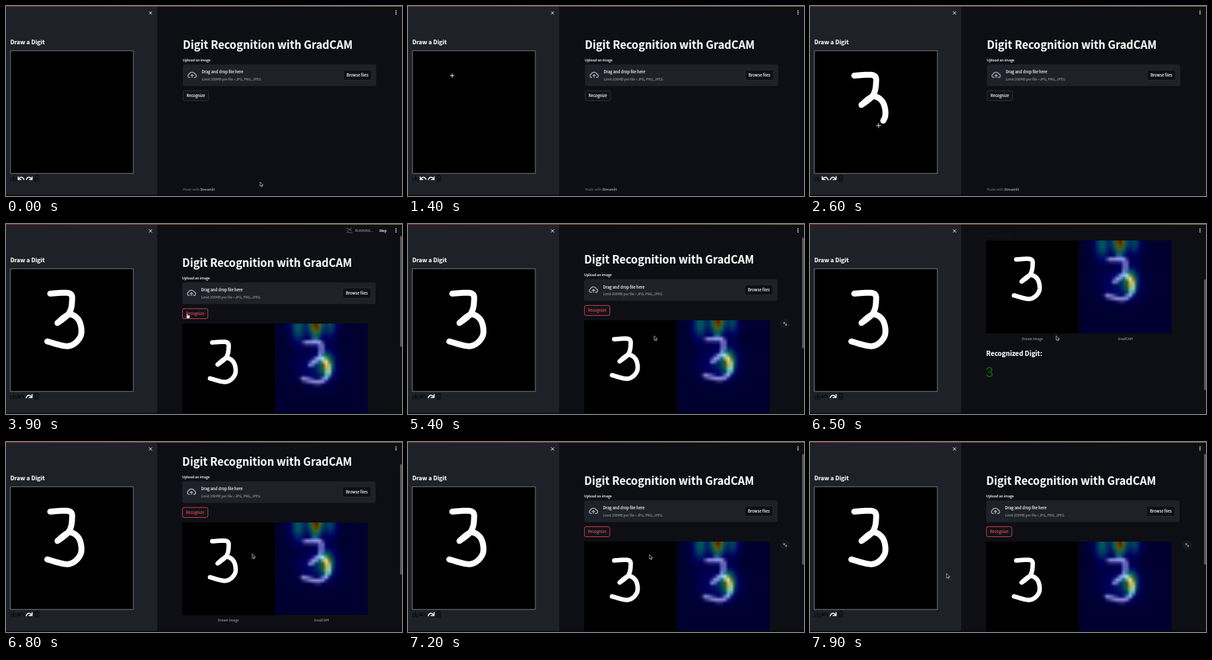
Write an HTML page with a canvas that moves like this. It is 600 px wide and 288 px high and loops after 8000 ms.

```html
<!DOCTYPE html>
<html lang="en">
<head>
<meta charset="utf-8">
<title>Digit Recognition with GradCAM</title>
<style>
html, body { margin: 0; width: 100%; height: 100%; overflow: hidden; background: #0d0f14; }
canvas { display: block; width: 600px; height: 288px; }
</style>
</head>
<body>
<canvas id="stage"></canvas>
<script>
const W = 600, H = 288, LOOP = 8000, STEP = 100;
const FONT = '"Noto Sans CJK JP", "Noto Sans CJK SC", "Noto Sans CJK", "Open Sans", sans-serif';
const BG = '#0d0f14', PANEL = '#1f2129', WHITE = '#fafafa', GREY = '#8b8c91', RED = '#e0474a', DARK = '#0b0c10';
const PEN_DOWN = 1500, PEN_UP = 2800, HOVER = 3600, RESULT = 3900;

const stage = document.getElementById('stage');
const dpr = window.devicePixelRatio || 1;
stage.width = W * dpr;
stage.height = H * dpr;
const ctx = stage.getContext('2d');

const clamp = v => Math.max(0, Math.min(1, v));
const ramp = (t, from, to) => clamp((t - from) / (to - from));
const ease = k => k * k * (3 - 2 * k);

// Pen path: a smooth curve through a few points.
const KNOTS = [[67, 105.5], [96, 105], [100, 118], [95, 136], [78, 150],
  [96, 137], [111, 147], [113, 170], [95, 185], [62.5, 178]];
const LAST = KNOTS.length - 1;
function spline(a, b, c, d, k) {
  return 0.5 * (2 * b + (c - a) * k + (2 * a - 5 * b + 4 * c - d) * k * k + (3 * b - a - 3 * c + d) * k * k * k);
}
function penAt(u) {
  const i = Math.min(LAST - 1, Math.floor(u));
  const p = n => KNOTS[Math.max(0, Math.min(LAST, n))];
  return [0, 1].map(j => spline(p(i - 1)[j], p(i)[j], p(i + 1)[j], p(i + 2)[j], u - i));
}
const penPos = t => LAST * ramp(t, PEN_DOWN, PEN_UP);

function stroke3(c, end = LAST) {
  if (end <= 0) return;
  c.beginPath();
  for (let u = 0; u < end; u += .05) c.lineTo(...penAt(u));
  c.lineTo(...penAt(end));
  c.lineWidth = 9;
  c.lineCap = c.lineJoin = 'round';
  c.strokeStyle = '#fff';
  c.stroke();
}

// Fits the drawing area into a square of the given size.
function stroke3In(c, size) {
  c.save();
  c.scale(size / 187, size / 187);
  c.translate(-6.5, -67.5);
  stroke3(c);
  c.restore();
}

// Low resolution heat overlay; each spot is x, y, width, height, strength.
const SPOTS = [[.44, -.02, .05, .12, .85], [.25, .04, .06, .12, .36], [.6, .02, .05, .1, .3],
  [.56, .44, .05, .09, .55], [.45, .47, .15, .12, .18]];
const jet = (v, peak) => clamp(1.5 - Math.abs(4 * v - peak));
function makeHeat() {
  const N = 28, c = document.createElement('canvas');
  c.width = c.height = N;
  const g = c.getContext('2d', { willReadFrequently: true });
  g.fillRect(0, 0, N, N);
  stroke3In(g, N);
  const img = g.getImageData(0, 0, N, N);
  for (let i = 0; i < N * N; i++) {
    const x = (i % N + .5) / N, y = (Math.floor(i / N) + .5) / N;
    const heat = SPOTS.reduce((sum, [cx, cy, w, h, a]) =>
      sum + a * Math.exp(-(((x - cx) / w) ** 2 + ((y - cy) / h) ** 2) / 2), 0);
    const ink = img.data[i * 4] * .55;
    for (let j = 0; j < 3; j++) img.data[i * 4 + j] = ink + 95 * jet(heat, 3 - j);
  }
  g.putImageData(img, 0, 0);
  return c;
}
const heatMap = makeHeat();

function text(s, x, y, size, color = WHITE, weight = 500, align = 'left', family = FONT) {
  ctx.font = `${weight} ${size}px ${family}`;
  ctx.fillStyle = ctx.strokeStyle = color;
  ctx.textAlign = align;
  ctx.lineWidth = .15;
  ctx.fillText(s, x, y);
  ctx.strokeText(s, x, y);
}
function box(x, y, w, h, r, fill, line) {
  ctx.beginPath();
  ctx.roundRect(x, y, w, h, r);
  ctx.fillStyle = fill;
  ctx.fill();
  if (!line) return;
  ctx.strokeStyle = line;
  ctx.lineWidth = .9;
  ctx.stroke();
}
function shape(d, x, y, line, width = 1, fill = null, flip = 1) {
  const path = new Path2D(d);
  ctx.save();
  ctx.translate(x, y);
  ctx.scale(flip, 1);
  if (fill) { ctx.fillStyle = fill; ctx.fill(path); }
  ctx.strokeStyle = line;
  ctx.lineWidth = width;
  ctx.stroke(path);
  ctx.restore();
}

function toolbar(t) {
  const arrow = 'M-4.5 -2V2.5H0M-4.3 2.2Q1 -4.5 4.5 3';
  shape('M-4 -1V4H4V-1M0 -4V2M-2 0L0 2L2 0', 11.5, 261, DARK, 1.2);
  shape(arrow, 23, 260.5, t < PEN_UP ? WHITE : DARK, 1.5);
  shape(arrow, 35, 260.5, WHITE, 1.5, null, -1);
  shape('M-4 -3.2H4M-1.5 -4.5H1.5M-3 -2.5L-2.6 4.5H2.6L3 -2.5M-1 -1V3M1 -1V3', 46.5, 261, DARK, 1.1);
}

function sidebar(t) {
  ctx.fillStyle = PANEL;
  ctx.fillRect(0, 0, 229, H);
  shape('M-2 -2L2 2M2 -2L-2 2', 219, 10.5, WHITE);
  text('Draw a Digit', 6.5, 58.2, 8.75, WHITE, 700);
  box(6.8, 67.8, 186.2, 186, 0, '#000', '#85868a');
  stroke3(ctx, penPos(t < PEN_UP ? t - 60 : t));
  toolbar(t);
}

function results(x) {
  const size = 140.5, y = 151;
  ctx.fillStyle = '#000';
  ctx.fillRect(x, y, size, size);
  ctx.save();
  ctx.translate(x, y);
  stroke3In(ctx, size);
  ctx.restore();
  ctx.drawImage(heatMap, x + size, y, size, size);
  text('Drawn Image', x + 70, 301.5, 5.2, GREY, 500, 'center');
  text('GradCAM', x + 211, 301.5, 5.2, GREY, 500, 'center');
  text('Recognized Digit:', x, 326.2, 9.95, WHITE, 700);
  text('3', x - .8, 357.5, 20.5, '#058205', 300, 'left', 'Roboto, sans-serif');
}

function page(t, scroll) {
  const done = t >= RESULT, x = done ? 267 : 268;
  ctx.save();
  ctx.beginPath();
  ctx.rect(229, 18.5, W - 229, H);
  ctx.clip();
  ctx.translate(0, -scroll);
  text('Digit Recognition with GradCAM', x, 65.3, 16.43, WHITE, 700);
  text('Upload an image', x, 83.7, 5.3);
  box(x, 88.5, 293, 33, 3, PANEL);
  shape('M-3 3.8H-4.5A2.8 2.8 0 0 1 -4.6 -1.4A4.7 4.3 0 0 1 4.2 -1.6A2.8 2.8 0 0 1 4.5 3.8H3M0 3.8V-.5M-2 1.3L0 -.7L2 1.3',
    x + 14, 104.6, '#a9abb8', 1.3);
  text('Drag and drop file here', x + 28.5, 102.4, 5.95);
  text('Limit 200MB per file • JPG, PNG, JPEG', x + 28.5, 112.8, 5.2, GREY);
  box(x + 243, 97, 43, 15.5, 2.5, '#0e1016', '#2b2d34');
  text('Browse files', x + 264.5, 106.8, 5.95, WHITE, 500, 'center');
  const hot = t >= HOVER;
  box(x + .3, 128.3, 38.6, 15.2, 2.5, '#11131a', hot ? RED : '#34363d');
  text('Recognize', x + 19.5, 138, 5.95, hot ? RED : WHITE, 500, 'center');
  if (done) results(x);
  const foot = done ? 440.6 : 280;
  text('Made with ', x, foot, 5.2, '#5c5e64');
  text('Streamlit', x + ctx.measureText('Made with ').width, foot, 5.2, '#a3a4a8');
  if ((t >= 4900 && t < 5600) || t >= 7200) {
    box(564, 148.5, 15, 15, 7.5, '#15171d');
    shape('M-2 -2L2 2M-2 -.4V-2H-.4M2 .4V2H.4', 571.4, 156.1, '#c4c4c8', .8);
  }
  ctx.restore();
}

function header(t, scroll) {
  const grad = ctx.createLinearGradient(0, 0, W, 0);
  grad.addColorStop(0, '#8f3033');
  grad.addColorStop(1, '#85774a');
  ctx.fillStyle = grad;
  ctx.fillRect(0, 0, W, 1);
  for (let i = 0; i < 3; i++) box(590.1, 6.4 + 2.4 * i, 1.7, 1.7, .85, WHITE);
  if (t >= 3700 && t < 4600) {
    const bob = t / STEP % 2 * .6;
    shape('M-4 -3L0 -1L3 -3.5M-3.5 1.2L0 -1L3 1.2M-4 3.5Q-2 2 0 3.5T4 3.5', 520.5, 10 - bob, '#707178', .9);
    text('RUNNING...', 529, 11.7, 5.2, '#83858a');
    text('Stop', 565.5, 11.7, 5.2);
  }
  if (t >= RESULT) box(597, 18 + scroll * .523, 3, 168, 1.5, '#55575b');
  ctx.fillStyle = '#07080b';
  ctx.fillRect(0, 286.5, W, 1.5);
}

// Pointer moves: start, end, x, y.
const MOVES = [[200, 500, 243, 205], [600, 1400, 67, 105.5], [PEN_DOWN, PEN_UP, 62.5, 178],
  [2900, HOVER, 275, 139], [4200, 5300, 373, 173], [7100, 7900, 207, 203]];
function pointerAt(t) {
  if (t > PEN_DOWN && t < PEN_UP) return penAt(penPos(t));
  return MOVES.reduce(([px, py], [from, to, x, y]) => {
    const k = ease(ramp(t, from, to));
    return [px + (x - px) * k, py + (y - py) * k];
  }, [385, 270]);
}

const ARROW = 'M0 -3.2V3.2L1.5 1.9L2.5 4.2L3.6 3.7L2.6 1.5H4.5Z';
const HAND = 'M-1.2 -3V1L-2.8 .4L-.6 4.2H3L3.8 1V-.4L.4 -.8V-3Q-.4 -3.8 -1.2 -3Z';
function pointer(t) {
  const [x, y] = pointerAt(t);
  if (x > 7 && x < 193 && y > 68 && y < 254) {
    shape('M-3.5 0H3.5M0 -3.5V3.5', x, y, '#222', 2);
    shape('M-3.2 0H3.2M0 -3.2V3.2', x, y, '#e8e8e8', .9);
  } else if (t >= HOVER && t < 4400) {
    shape(HAND, x, y, '#222', .7, '#fff');
  } else {
    shape(ARROW, x, y, '#dcdcdc', .7, '#000');
  }
}

function draw(now) {
  const t = Math.floor((now % LOOP) / STEP) * STEP;
  const scroll = 160.5 * (ease(ramp(t, 5330, 6000)) - ease(ramp(t, 6290, 6990)));
  ctx.setTransform(dpr, 0, 0, dpr, 0, 0);
  ctx.fillStyle = BG;
  ctx.fillRect(0, 0, W, H);
  page(t, scroll);
  sidebar(t);
  header(t, scroll);
  pointer(t);
}

const start = performance.now();
function loop() {
  draw(performance.now() - start);
  requestAnimationFrame(loop);
}
loop();
</script>
</body>
</html>
```
